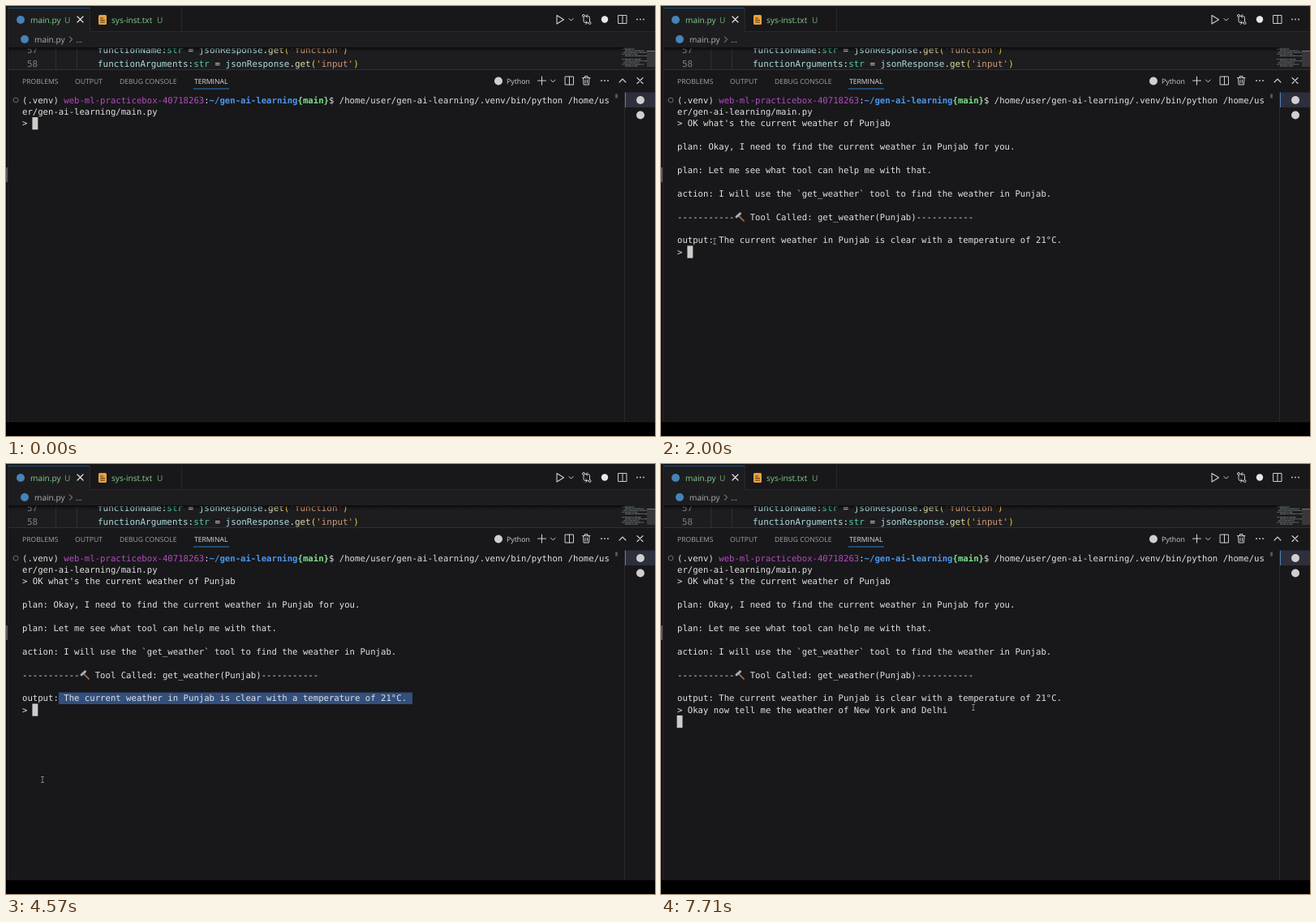
An HTML page with a canvas for the animation above (8 s loop, 800 by 530 pixels).

```html
<!DOCTYPE html>
<html lang="en">
<head>
<meta charset="utf-8">
<title>Terminal chat</title>
<style>
html, body { margin: 0; width: 100%; height: 100%; overflow: hidden; background: #000; }
canvas { display: block; }
</style>
</head>
<body>
<canvas id="stage" width="800" height="530"></canvas>
<script>
const ctx = document.getElementById('stage').getContext('2d');
ctx.textRendering = 'geometricPrecision';
ctx.lineCap = ctx.lineJoin = 'round';

const LOOP = 8000, LEFT = 20, TOP = 108.8, COL = 6.413, ROW = 14.4;
const TEXT = '#e2e2e2', ICON = '#cfcfcf', DIM = '#a2a2a2', GREEN = '#82cf8c', BLUE = '#2b7cc4';
const PANEL = '#18181a', EDITOR = '#1d1d1f', EDGE = '#29292c';
const MONO = '"DejaVu Sans Mono", monospace', UI = '"Open Sans", "Noto Sans", sans-serif';
const TERM = `10.652px ${MONO}`, CODE = `10.92px ${MONO}`;

const colX = c => LEFT + c * COL;
const rowY = r => TOP + r * ROW;

function rect(x, y, w, h, color) {
  ctx.fillStyle = color;
  ctx.fillRect(x, y, w, h);
}
function text(str, x, y, color, font) {
  ctx.font = font;
  ctx.fillStyle = color;
  ctx.fillText(str, x, y);
  return x + ctx.measureText(str).width;
}
function dot(x, y, r, color) {
  ctx.fillStyle = color;
  ctx.beginPath();
  ctx.arc(x, y, r, 0, 7);
  ctx.fill();
}
function stroke(d, color = ICON, width = 1) {
  ctx.strokeStyle = color;
  ctx.lineWidth = width;
  ctx.stroke(new Path2D(d));
}
// Each span is [string, colour, bold].
function spans(list, x, y, font) {
  for (const [str, color, bold] of list) x = text(str, x, y, color, (bold ? 'bold ' : '') + font);
}
const line = (str, r, color = TEXT) => text(str, LEFT, rowY(r) + 10.8, color, TERM);

function codeLine(num, name, key, y) {
  text(num, 26, y, '#7a8088', CODE);
  spans([[name, '#aedbe0'], [':', TEXT], ['str', '#4ec9a5'], [' = ', TEXT], ['jsonResponse', '#aedbe0'],
    ['.', TEXT], ['get', '#dcdcaa'], ['(', '#f2cf3a'], [`'${key}'`, '#ce9a78'], [')', '#f2cf3a']], 113, y, CODE);
}

function splitIcon(x, y) {
  stroke(`M${x - 5} ${y - 5}h10v10h-10zM${x} ${y - 5}v10`);
}
function dots(x, y) {
  for (const d of [-4, 0, 4]) dot(x + d, y, 0.9, ICON);
}

function editor() {
  rect(0, 0, 800, 513, EDITOR);
  codeLine('57', 'functionName', 'function', 58.2);
  codeLine('58', 'functionArguments', 'input', 74.6);
  rect(61, 51, 1, 27, '#303033');
  rect(87, 51, 1, 27, '#303033');

  // Minimap
  for (let i = 0; i < 11; i++) {
    if (i === 5) continue;
    const x = 759 + (i * 5 % 3) * 2, w = 14 + (i * 7 % 5) * 4;
    for (let j = 0; j < w; j += 4) rect(x + j, 52.5 + i * 2.1, 3.6, 1.1, (i + j) % 3 ? '#6a6d6f' : '#4c6068');
  }
  rect(790, 55, 10, 20, '#38383b');
  rect(790, 55, 10, 1, '#77777a');

  // Tabs and breadcrumb
  rect(0, 0, 800, 52, PANEL);
  rect(2, 31, 798, 1, EDGE);
  rect(2, 2, 102, 50, EDITOR);
  rect(104, 32, 696, 20, EDITOR);
  const shade = ctx.createLinearGradient(0, 51, 0, 56);
  shade.addColorStop(0, '#000a');
  shade.addColorStop(1, '#0000');
  rect(2, 51, 760, 5, shade);
  rect(2, 2, 102, 1, '#1b5488');
  rect(103, 2, 1, 30, EDGE);
  rect(216, 2, 1, 30, EDGE);
  const ui = `10.1px ${UI}`;
  dot(18, 17, 5, '#4584b6');
  text('main.py', 30, 20.5, GREEN, ui);
  text('U', 72, 20.5, '#6cae74', ui);
  stroke('M88 13l7 7m0-7l-7 7', '#e4e4e4', 1.2);
  ctx.fillStyle = '#e8a33d';
  ctx.beginPath();
  ctx.roundRect(114, 11, 10, 12, 1.5);
  ctx.fill();
  stroke('M116.5 15h3M116.5 17.5h5M116.5 20h5', '#4a351a');
  text('sys-inst.txt', 130, 20.5, GREEN, ui);
  text('U', 186, 20.5, '#6cae74', ui);
  dot(23, 41, 5, '#4584b6');
  text('main.py', 35, 45, '#b0b0b0', ui);
  stroke('M78.5 38l3 3.2-3 3.2', DIM);
  text('...', 86, 45, '#b0b0b0', ui);

  // Editor actions
  stroke('M679 11.5v10.5l8.5-5.2z', ICON, 1.1);
  stroke('M694 15.5l2.6 2.6 2.6-2.6');
  stroke('M712 14v4.5q0 2 2 2h2.5m-1.8-2l2 2-2 2M719.5 19v-4.5q0-2-2-2h-2.5m1.8-2l-2 2 2 2');
  stroke('M710.5 12a1.5 1.5 0 1 0 3 0a1.5 1.5 0 1 0-3 0M718 21a1.5 1.5 0 1 0 3 0a1.5 1.5 0 1 0-3 0');
  dot(738, 16.5, 4.2, '#e8e8e8');
  splitIcon(760, 16.5);
  dots(782, 16.5);
}

function panel() {
  rect(0, 78, 800, 435, PANEL);
  rect(2, 78, 798, 1, '#303033');
  const tab = `8.6px ${UI}`;
  text('PROBLEMS', 20, 95.6, DIM, tab);
  text('OUTPUT', 85, 95.6, DIM, tab);
  text('DEBUG CONSOLE', 140, 95.6, DIM, tab);
  text('TERMINAL', 232, 95.6, '#e0e0e0', tab);
  rect(231, 101.5, 44, 1, BLUE);

  dot(607, 92.5, 5, ICON);
  text('Python', 617, 96, ICON, `8.8px ${UI}`);
  stroke('M655.5 92h10M660.5 87v10', ICON, 1.1);
  stroke('M671.5 91l2.8 2.8 2.8-2.8');
  splitIcon(694.5, 92);
  stroke('M710.5 88.5h9.5M713.5 88v-1.5h3.5v1.5M711.5 88.5l.6 8.5h6.3l.6-8.5M714 91v4M716.5 91v4');
  dots(738, 92);
  stroke('M756 94l4-4 4 4', ICON, 1.1);
  stroke('M778 88.5l7 7m0-7l-7 7', ICON, 1.1);

  rect(762, 107, 1, 406, EDGE);
  rect(763, 106.5, 37, 18.5, '#2d2f3c');
  rect(763, 106.5, 1, 18.5, '#4d7fae');
  dot(782, 116, 5, ICON);
  dot(782, 134.5, 5, ICON);
  rect(751, 108.5, 3, 5, '#55555a');
  rect(0, 0, 2, 513, '#111113');
  rect(2, 0, 1, 513, '#252528');
  rect(0, 199, 2, 18, '#55555a');
  rect(0, 513, 800, 17, '#000');
}

function hammer(x, y) {
  stroke(`M${x + 4} ${y + 4}l6.5 6.5`, '#9b6a4c', 1.9);
  stroke(`M${x + 1.5} ${y + 5.5}l4.5-4`, '#a5adb3', 3);
}

const ask1 = "OK what's the current weather of Punjab";
const ask2 = 'Okay now tell me the weather of New York';
const ask3 = ' and Delhi';

// [time, row, text]
const replies = [
  [1000, 4, 'plan: Okay, I need to find the current weather in Punjab for you.'],
  [1140, 6, 'plan: Let me see what tool can help me with that.'],
  [1430, 8, 'action: I will use the `get_weather` tool to find the weather in Punjab.'],
  [1570, 10, '-----------   Tool Called: get_weather(Punjab)-----------'],
  [1710, 12, 'output: The current weather in Punjab is clear with a temperature of 21°C.'],
];
// [time, row, column]
const carets = [
  [0, 2, 2], [430, 2, 2 + ask1.length], [570, 3, 0], [1000, 5, 0], [1140, 7, 0], [1430, 9, 0], [1570, 11, 0],
  [1710, 13, 2], [6000, 13, 42], [6710, 13, 52], [7290, 14, 0],
];
// [time, x, y]
const path = [
  [430, 297, 226], [1570, 297, 226], [2000, 66, 290], [2140, 66, 290], [2438, 427, 292],
  [2580, 501, 290], [3150, 46, 389], [3700, 45, 389], [7000, 45, 389], [7710, 385, 300],
];

function pointer(t) {
  const i = path.findIndex(p => p[0] > t);
  if (i < 0) return path.at(-1).slice(1);
  const [a, b] = [path[i - 1], path[i]];
  const u = (t - a[0]) / (b[0] - a[0]), e = u * u * (3 - 2 * u);
  return [a[1] + (b[1] - a[1]) * e, a[2] + (b[2] - a[2]) * e];
}

// Dictated words shown on black until they are committed.
function dictate(t, str, start, end, commit, r, c) {
  if (t < start || t >= commit) return;
  const words = str.split(' ');
  const shown = words.slice(0, Math.ceil(words.length * (t - start) / (end - start))).join(' ');
  ctx.font = CODE;
  rect(colX(c), rowY(r), ctx.measureText(shown).width, ROW, '#000');
  text(shown, colX(c), rowY(r) + 10.8, '#fff', CODE);
}

function terminal(t) {
  stroke('M9 116a3 3 0 1 0 6 0a3 3 0 1 0-6 0', '#6c6c70');
  spans([['(.venv) ', TEXT], ['web-ml-practicebox-40718263', '#b44bc0'], [':', TEXT],
    ['~/gen-ai-learning', '#4c97ee', true], ['{main}', '#7fe08a', true],
    ['$ /home/user/gen-ai-learning/.venv/bin/python /home/us', TEXT]], LEFT, rowY(0) + 10.8, TERM);
  line('er/gen-ai-learning/main.py', 1);

  const [mx, my] = t >= 430 ? pointer(t) : [0, 0];
  if (t >= 2140 && t < 6000) {
    const end = t >= 2570 ? 75 : Math.max(7, Math.floor((mx - 28) / COL));
    rect(colX(7), rowY(12), (end - 7) * COL, ROW, '#324f7d');
  }

  line('> ' + (t >= 430 ? ask1 : ''), 2);
  for (const [at, r, str] of replies) if (t >= at) line(str, r);
  if (t >= 1570) hammer(colX(11) + 1, rowY(10) + 1.5);
  if (t >= 1710) line('> ' + (t >= 6000 ? ask2 : '') + (t >= 6710 ? ask3 : ''), 13);

  const [, r, c] = carets.findLast(k => t >= k[0]);
  rect(colX(c) - 0.4, rowY(r) - 0.5, COL + 0.5, ROW + 0.8, '#cccccc');
  dictate(t, ask1, 140, 290, 430, 2, 2);
  dictate(t, ask2, 4600, 5570, 6000, 13, 2);
  dictate(t, ask3, 6400, 6570, 6710, 13, 42);

  if (t >= 430) stroke(`M${mx - 1.5} ${my - 3.5}h3M${mx} ${my - 3.5}v7M${mx - 1.5} ${my + 3.5}h3`, '#9a9a9a', 0.8);
}

function frame(now) {
  const step = Math.floor((now % LOOP) * 0.007 + 0.05);
  editor();
  panel();
  terminal(step / 0.007 + 10);
  requestAnimationFrame(frame);
}
requestAnimationFrame(frame);
</script>
</body>
</html>
```
